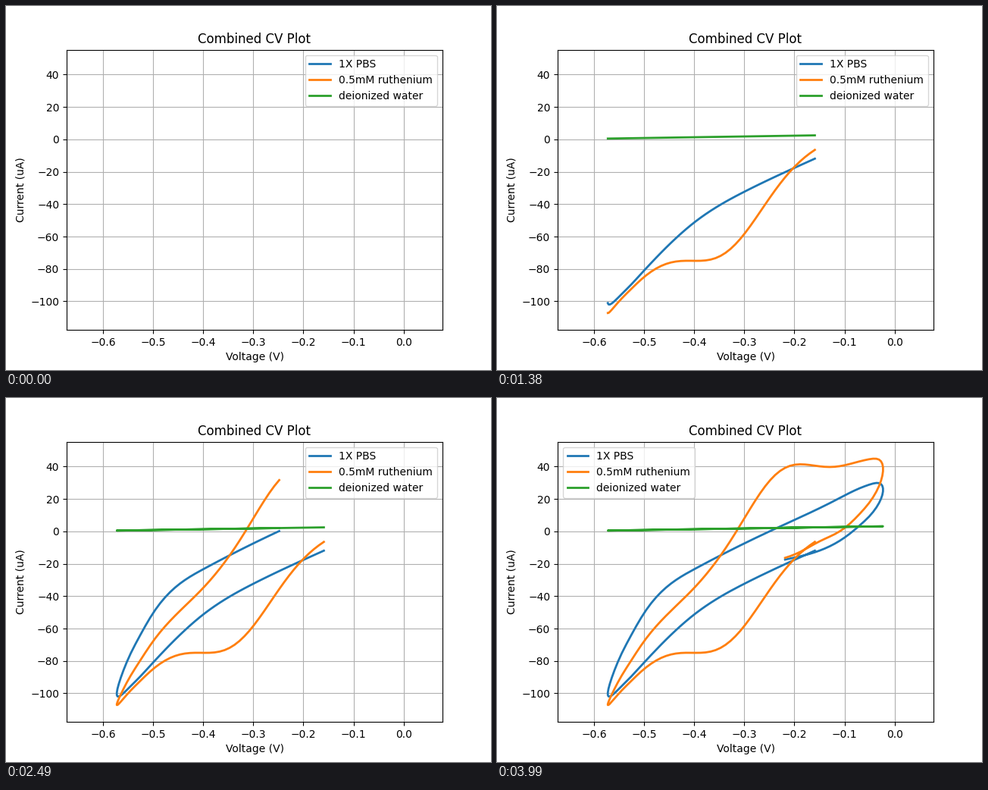
A matplotlib script for the animation above (4020 ms loop, 640 px wide and 480 px high).

```python
import numpy as np
import matplotlib.pyplot as plt
from matplotlib.animation import FuncAnimation

FRAMES, INTERVAL = 134, 30
STEP, HALF, WINDOW = 0.0099, 63, 15   # volts per sample, samples per sweep, smoothing
V_LOW, TURN = -0.6096, 46.5           # lower vertex of the sweep and its sample index

# Key points of the buffer curve: (sample, current in uA)
BUFFER = [(1, -11.9), (15.2, -32.3), (25.4, -51.5), (36, -82.9),
          (43.5, -101.7), (50, -90.3), (57.5, -50.8), (67.6, -23.5),
          (83, 0.2), (96, 19), (102, 27.8), (106, 29.8), (113, 17.5),
          (121, -3.8), (133, -17.4)]

# Redox peaks on top of the buffer: (centre sample, height in uA, width)
PEAKS = [(0, 7, 8), (19.5, -32, 7.5), (60, -18, 9.5),
         (85, 28.5, 6.7), (102, 15, 13), (126, 3, 3)]


def spline(knots, x):
    """Natural cubic spline through the knots."""
    kx, ky = np.array(knots, float).T
    h = np.diff(kx)
    slope = np.diff(ky) / h
    a = np.eye(len(kx))
    b = np.zeros(len(kx))
    for i in range(1, len(kx) - 1):
        a[i, i - 1:i + 2] = h[i - 1], 2 * (h[i - 1] + h[i]), h[i]
        b[i] = 6 * (slope[i] - slope[i - 1])
    m = np.linalg.solve(a, b)
    i = np.clip(np.searchsorted(kx, x) - 1, 0, len(h) - 1)
    p, q, w = kx[i + 1] - x, x - kx[i], h[i]
    return ((m[i] * p**3 + m[i + 1] * q**3) / (6 * w)
            + (ky[i] / w - m[i] * w / 6) * p
            + (ky[i + 1] / w - m[i + 1] * w / 6) * q)


def sweep(count):
    """Triangle wave smoothed by a moving average."""
    pad = WINDOW // 2
    s = np.arange(1 - pad, count + 1 + pad)
    phase = (s - TURN) % (2 * HALF)
    raw = V_LOW + STEP * np.minimum(phase, 2 * HALF - phase)
    return np.convolve(raw, np.ones(WINDOW) / WINDOW, mode="valid")


sample = np.arange(1, FRAMES)
volts = sweep(len(sample))
pbs = spline(BUFFER, sample)
ruthenium = pbs + sum(height * np.exp(-((sample - centre) / width)**2 / 2)
                      for centre, height, width in PEAKS)
water = 0.5 + 4.8 * (volts - volts.min())

series = [("1X PBS", pbs), ("0.5mM ruthenium", ruthenium),
          ("deionized water", water)]

fig, ax = plt.subplots(figsize=(6.4, 4.8), dpi=100)
ax.set(xlim=(-0.6725, 0.0776), ylim=(-117.65, 55.37),
       xlabel="Voltage (V)", ylabel="Current (uA)")
ax.set_title("Combined CV Plot", x=0.498)
ax.grid(True)
lines = [ax.plot([], [], lw=2, label=name)[0] for name, _ in series]
ax.legend(loc="best", bbox_to_anchor=(0, 0, 0.999, 1))


def update(n):
    for line, (_, current) in zip(lines, series):
        line.set_data(volts[:n], current[:n])
    return lines


anim = FuncAnimation(fig, update, frames=FRAMES, interval=INTERVAL,
                     init_func=lambda: update(0), repeat=True, repeat_delay=0)
plt.show()
```
